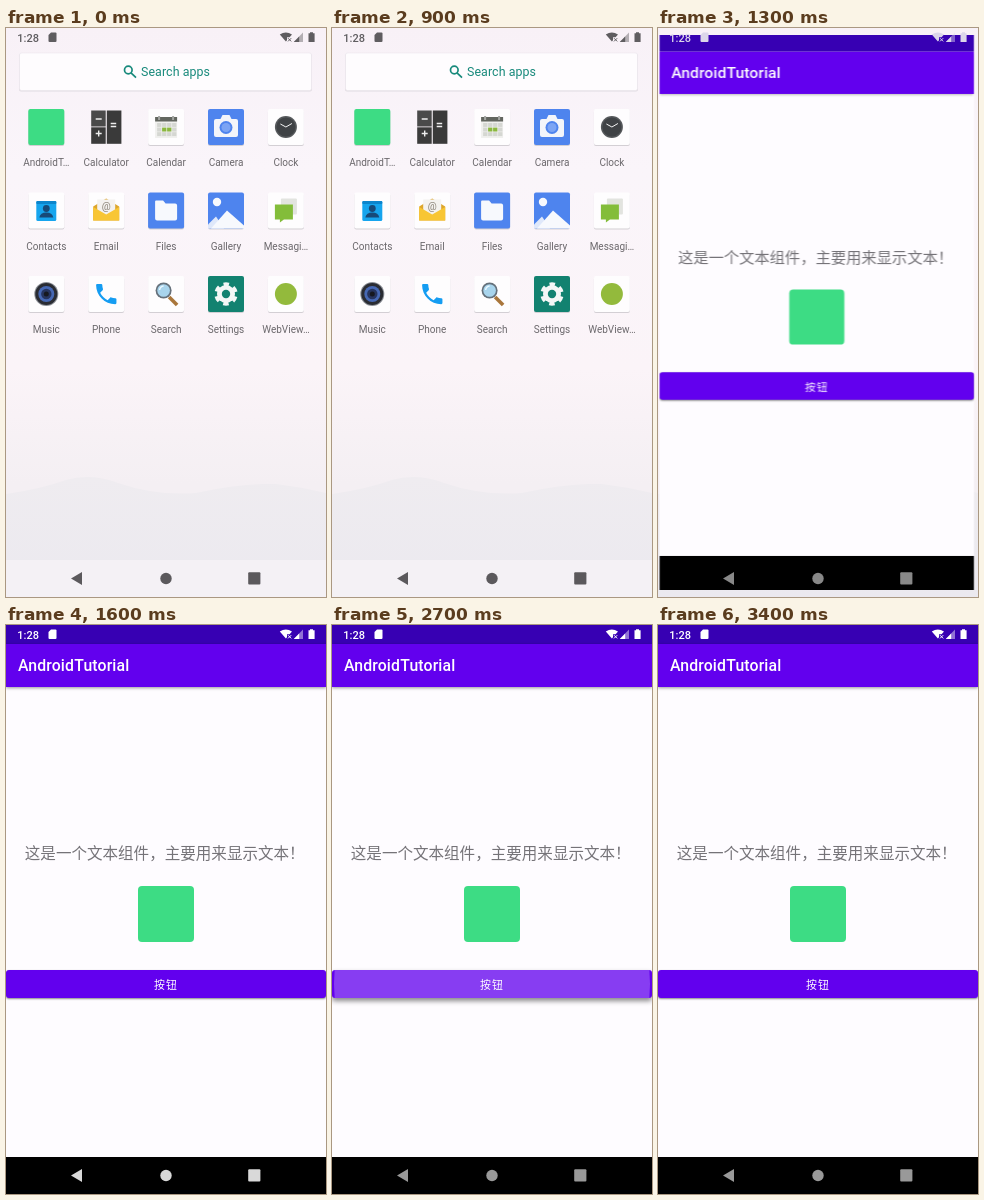
These frames come from a looping animation (320x569 px, 3500 ms). An HTML page:

```html
<!DOCTYPE html>
<html lang="zh-CN">
<head>
<meta charset="utf-8">
<title>App launch</title>
<style>
html, body { margin: 0; width: 100%; height: 100%; overflow: hidden; }
#stage { position: relative; width: 320px; height: 569px; overflow: hidden; background: #f8f3f8; font-family: Roboto, sans-serif; }
#stage > *, .app > * { position: absolute; }
svg { display: block; overflow: visible; }
.full { left: 0; top: 0; width: 320px; height: 569px; }

.drawer, .scrim, .tapped, .app, .content, .ripple, .button, .nav, .status {
  animation: 3.5s step-end infinite;
}
.scrim { left: 0; top: 532px; width: 320px; height: 37px; background: #f4f1f5; animation-name: clear; }
.drawer { animation-name: fade, drop; }
.tapped { animation-name: lift; }
.drawer text { font-size: 10px; fill: #6b686c; text-anchor: middle; }
.drawer .hint { font-size: 12.4px; letter-spacing: .08px; fill: #17897b; text-anchor: start; }

.app { background: #fefcff; transform-origin: 0 0; opacity: 0; animation-name: open; }
.content { animation-name: appear; }
.content > * { position: absolute; }
.bar { left: 0; top: 0; width: 320px; height: 19px; background: #3700b3; }
.title { left: 0; top: 19px; width: 308px; height: 43px; padding-left: 12px; background: #6200ee; color: #fff;
  font-size: 15.8px; font-weight: 500; line-height: 44px; letter-spacing: .15px; box-shadow: 0 1px 3px #0006; }
.cjk { font-family: "Noto Sans CJK SC", "Noto Sans CJK", sans-serif; white-space: nowrap; }
.message { left: 18.8px; top: 215px; font-size: 15.56px; line-height: 24px; color: #757378; }
.logo { left: 132px; top: 261px; width: 56px; height: 56px; border-radius: 4px; background: #3ddc84; }
.button { left: 0; top: 345px; width: 320px; height: 28px; border-radius: 3px; overflow: hidden; background: #6200ee;
  color: #fff; font-size: 10.9px; font-weight: 500; letter-spacing: 1px; line-height: 28px; text-align: center;
  box-shadow: 0 1px 2px #0007; animation-name: raise; }
.button span { position: relative; }
.ripple { position: absolute; left: 0; top: -146px; width: 320px; height: 320px; border-radius: 50%;
  background: #fff; opacity: 0; animation-name: ripple; }
.base { left: 0; top: 532px; width: 320px; height: 37px; background: #000; }

.status { color: #5f5d60; animation-name: status; }
.status text { font-size: 11px; font-weight: 500; }
.nav { color: #5b595c; animation-name: nav; }

@keyframes clear { 0% { opacity: 1 } 28.5% { opacity: .5 } 31.4%, 100% { opacity: 0 } }
@keyframes fade {
  0% { opacity: 1 } 28.5% { opacity: .9 } 31.4% { opacity: .58 } 34.2% { opacity: .2 } 37.1%, 100% { opacity: 0 }
}
@keyframes drop {
  0% { transform: none } 28.5% { transform: translateY(9px) } 31.4% { transform: translateY(29px) }
  34.2%, 100% { transform: translateY(45px) }
}
@keyframes lift { 0% { opacity: 1 } 28.5%, 100% { opacity: 0 } }
@keyframes open {
  0% { opacity: 0 }
  28.5% { opacity: 1; transform: translate(16px, 85px) scale(.3); clip-path: inset(117px 0 117px round 8px) }
  31.4% { opacity: 1; transform: translate(8px, 67px) scale(.7125); clip-path: inset(91px 0 89px round 3px) }
  34.2% { opacity: 1; transform: translate(3.5px, 20px) scale(.92); clip-path: inset(30px 0 29px) }
  37.1% { opacity: 1; transform: translate(1.5px, 5px) scale(.983); clip-path: inset(3px 0) }
  39.9%, 100% { opacity: 1; transform: none; clip-path: inset(0) }
}
@keyframes appear {
  0% { opacity: .04 } 31.4% { opacity: .18 } 34.2% { opacity: .85 } 37.1%, 100% { opacity: 1 }
}
@keyframes status {
  0% { color: #5f5d60 } 34.2% { color: #b9b3c4 } 37.1% { color: #dcd6ea } 39.9%, 100% { color: #fff }
}
@keyframes nav {
  0% { color: #5b595c } 34.2% { color: #727272 } 37.1% { color: #888 } 39.9% { color: #b4b4b4 }
  42.8% { color: #d9d9d9 } 65.7% { color: #c4c4c4 } 68.5% { color: #b0b0b0 } 71.4%, 100% { color: #999 }
}
@keyframes ripple {
  0% { opacity: 0 }
  74.2% { opacity: .2; transform: scale(.7) }
  77.1% { opacity: .24; transform: scale(.9875) }
  79.9% { opacity: .24; transform: scale(1.1) }
  82.8% { opacity: .17; transform: scale(1.1) }
  85.7% { opacity: .1; transform: scale(1.1) }
  88.5% { opacity: .04; transform: scale(1.1) }
  91.4%, 100% { opacity: 0; transform: scale(1.1) }
}
@keyframes raise {
  0% { box-shadow: 0 1px 2px #0007 } 74.2% { box-shadow: 0 2px 3px #0007 }
  77.1% { box-shadow: 0 3px 5px #0007 } 85.7% { box-shadow: 0 2px 3px #0007 }
  88.5%, 100% { box-shadow: 0 1px 2px #0007 }
}
</style>
</head>
<body>
<div id="stage">
  <svg class="full" viewBox="0 0 320 569">
    <defs>
      <linearGradient id="sky" x2="0" y2="1">
        <stop offset="0" stop-color="#f8f1f7"/>
        <stop offset=".25" stop-color="#faf5fa"/>
        <stop offset=".6" stop-color="#fbf4f8"/>
        <stop offset=".8" stop-color="#f4eff3"/>
      </linearGradient>
      <linearGradient id="hill" x2="0" y2="1">
        <stop offset="0" stop-color="#efecf0"/>
        <stop offset="1" stop-color="#ebe9ef"/>
      </linearGradient>
    </defs>
    <path d="M0 0H320V569H0Z" fill="url(#sky)"/>
    <path d="M0 466Q35 461 60 452Q85 445 112 455Q150 468 190 465Q235 455 270 456Q295 459 320 465V569H0Z" fill="url(#hill)"/>
  </svg>
  <div class="scrim"></div>

  <svg class="drawer full" id="drawer" viewBox="0 0 320 569">
    <rect x="13" y="25.5" width="293" height="38" rx="2" fill="#e0dbe1"/>
    <rect x="13.5" y="25" width="292" height="37.5" rx="2" fill="#fefcfe" stroke="#ebe6ec" stroke-width=".6"/>
    <g fill="none" stroke="#17897b" stroke-width="1.7">
      <circle cx="122.3" cy="42" r="3.8"/><path d="M125 44.8L130 49.6"/>
    </g>
    <text class="hint" x="135" y="48.3">Search apps</text>
  </svg>

  <div class="app full">
    <div class="content full">
      <div class="bar"></div>
      <div class="title">AndroidTutorial</div>
      <div class="message cjk">这是一个文本组件，主要用来显示文本！</div>
      <div class="logo"></div>
      <div class="button cjk"><i class="ripple"></i><span>按钮</span></div>
      <div class="base"></div>
    </div>
  </div>

  <svg class="status full" viewBox="0 0 320 569" fill="currentColor">
    <text x="11.3" y="13.6">1:28</text>
    <path d="M45 4.5H49.5Q50.5 4.5 50.5 5.5V13Q50.5 14 49.5 14H43.5Q42.5 14 42.5 13V7Z"/>
    <path d="M273.8 6.5Q279.8 2.5 286 6.5L283.6 9.3H281V12.2L279.9 13.6Z"/>
    <path d="M282 10.2L285.2 13.4M285.2 10.2L282 13.4" stroke="currentColor"/>
    <path d="M297 4.5V14H287.8Z" opacity=".45"/>
    <path d="M293.2 8.5V14H287.8Z"/>
    <path d="M304 4.3H307V5.3H308.6V14H302.5V5.3H304Z"/>
  </svg>
  <svg class="nav full" viewBox="0 0 320 569" fill="currentColor">
    <path d="M76 544V557L65 550.5Z"/>
    <circle cx="160" cy="550.5" r="5.7"/>
    <rect x="242.2" y="544.3" width="12.2" height="12.2" rx="1"/>
  </svg>
</div>

<script>
const WHITE = '#fefdfe', BLUE = '#4e84ee', TEAL = '#128270';
const disc = (x, y, r, fill) => `<circle cx="${x}" cy="${y}" r="${r}" fill="${fill}"/>`;
const box = (x, y, w, h, fill, r = 0) =>
  `<rect x="${x}" y="${y}" width="${w}" height="${h}" rx="${r}" fill="${fill}"/>`;
const fillPath = (d, fill) => `<path d="${d}" fill="${fill}"/>`;
const line = (d, color, width = 1.4) =>
  `<path d="${d}" fill="none" stroke="${color}" stroke-width="${width}"/>`;

// Calendar sheet cells
let cells = '';
for (let i = 0; i < 12; i++) {
  const x = -9 + (i % 4) * 5, y = -4 + Math.floor(i / 4) * 4.6;
  cells += box(x, y, 4.3, 3.9, i === 5 || i === 6 ? '#8bb83f' : '#d5d7d2');
}

// label, tile colour, drawing around the tile centre
const apps = [
  ['AndroidT…', '#3ddc84', ''],
  ['Calculator', '', box(-15, -16.5, 14.5, 16, '#4a4a4a') + box(-15, .3, 14.5, 16.5, '#3b3b3b') +
    box(.6, -16.5, 14.6, 33.3, '#3a3a3a') +
    line('M-10.5 -8H-4.5M-10.5 6.5H-4.5M-7.5 3.5V9.5M4.5 -3.5H10M4.5 -.5H10', '#eee')],
  ['Calendar', WHITE, box(-11, -10, 22, 21, '#f0f0ee') + box(-11, -10, 22, 4.5, '#62665f') +
    box(-8, -11, 2, 4, '#a5a7a3') + box(6, -11, 2, 4, '#a5a7a3') + cells],
  ['Camera', BLUE, box(-12, -8, 24, 18, '#f3f5fa', 2) + fillPath('M-6 -7L-3.5 -12H3.5L6 -7Z', '#f3f5fa') +
    disc(0, .5, 6.5, BLUE) + disc(0, .5, 4.5, '#7ba4f4')],
  ['Clock', WHITE, disc(0, 0, 11, '#55585b') + disc(0, 0, 9.5, '#3f4245') +
    line('M-5.5 -3L0 0L6 -3.5', '#f5f5f5', 1)],
  ['Contacts', WHITE, box(-10, -9.5, 20, 20, '#16a5ee', 1.5) + box(-10, -9.5, 20, 3, '#0c85cc', 1) +
    disc(0, -2, 3.4, '#174a78') + fillPath('M-7 7Q-6 2 0 2Q6 2 7 7Z', '#174a78')],
  ['Email', WHITE, fillPath('M-13 -4L0 -12L13 -4V10H-13Z', '#dda62c') + box(-9, -11, 18, 16, '#f4f2ef') +
    '<text y="-.5" style="font-size:10px;fill:#8a8377">@</text>' +
    fillPath('M-13 -3.5L0 4L13 -3.5V10H-13Z', '#f8c634')],
  ['Files', BLUE, fillPath('M-10 -10H-3L-.5 -7H9Q11 -7 11 -5V8Q11 10 9 10H-9Q-11 10 -11 8V-9Q-11 -10 -10 -10Z', '#f7f9fd')],
  ['Gallery', BLUE, disc(-9, -8.5, 4.2, '#f7f9fd') + fillPath('M-18 14L-10 6L-2 18H-18Z', '#dfe8fa') +
    fillPath('M-15 18L1 0L18 15V18Z', '#f7f9fd')],
  ['Messagi…', WHITE, box(-5, -12, 16, 16, '#e2e4df', 1) + fillPath('M-11 -6H7V9H-2L-6 12V9H-11Z', '#83bd3a')],
  ['Music', WHITE, disc(0, 0, 12, '#8b8f96') + disc(0, 0, 11, '#2a2c33') + disc(0, 0, 8, '#4668b4') +
    disc(0, 0, 5.2, '#26345e') + disc(0, 0, 2.5, '#16181f')],
  ['Phone', WHITE, '<g transform="translate(-13.5 -13.5) scale(1.13)">' +
    fillPath('M6.6 10.8c1.4 2.8 3.8 5.1 6.6 6.6l2.2-2.2c.3-.3.7-.4 1-.2 1.1.4 2.3.6 3.6.6q1 0 1 1V20q0 1-1 1C10.6 21 3 13.4 3 4q0-1 1-1h3.5q1 0 1 1c0 1.3.2 2.5.6 3.6.1.3 0 .7-.3 1z', '#159df2') + '</g>'],
  ['Search', WHITE, line('M3 3L11 11', '#a9763b', 3.6) + disc(-2.5, -3.5, 8, '#65707a') + disc(-2.5, -3.5, 6.3, '#a8d4ec') +
    line('M-6.5 -4Q-6 -7.5 -2.5 -8', '#eaf8ff')],
  ['Settings', TEAL, disc(0, 0, 9, '#f4f7f6') +
    '<circle r="9.5" fill="none" stroke="#f4f7f6" stroke-width="4.4" stroke-dasharray="5.2 4.75" transform="rotate(14.3)"/>' +
    disc(0, 0, 4.2, TEAL)],
  ['WebView…', WHITE, disc(0, 0, 11, '#93ba3c')]
];

document.getElementById('drawer').innerHTML += apps.map(([label, tile, art], i) => {
  const x = 40.3 + (i % 5) * 59.9, y = 99 + Math.floor(i / 5) * 83.5;
  const back = tile && box(-18, -17, 36, 36, '#d3cfd4', 2) + box(-18, -18, 36, 36, tile, 2);
  return `<g transform="translate(${x} ${y})"${i ? '' : ' class="tapped"'}>` +
    `${back}${art}<text y="39">${label}</text></g>`;
}).join('');
</script>
</body>
</html>
```
